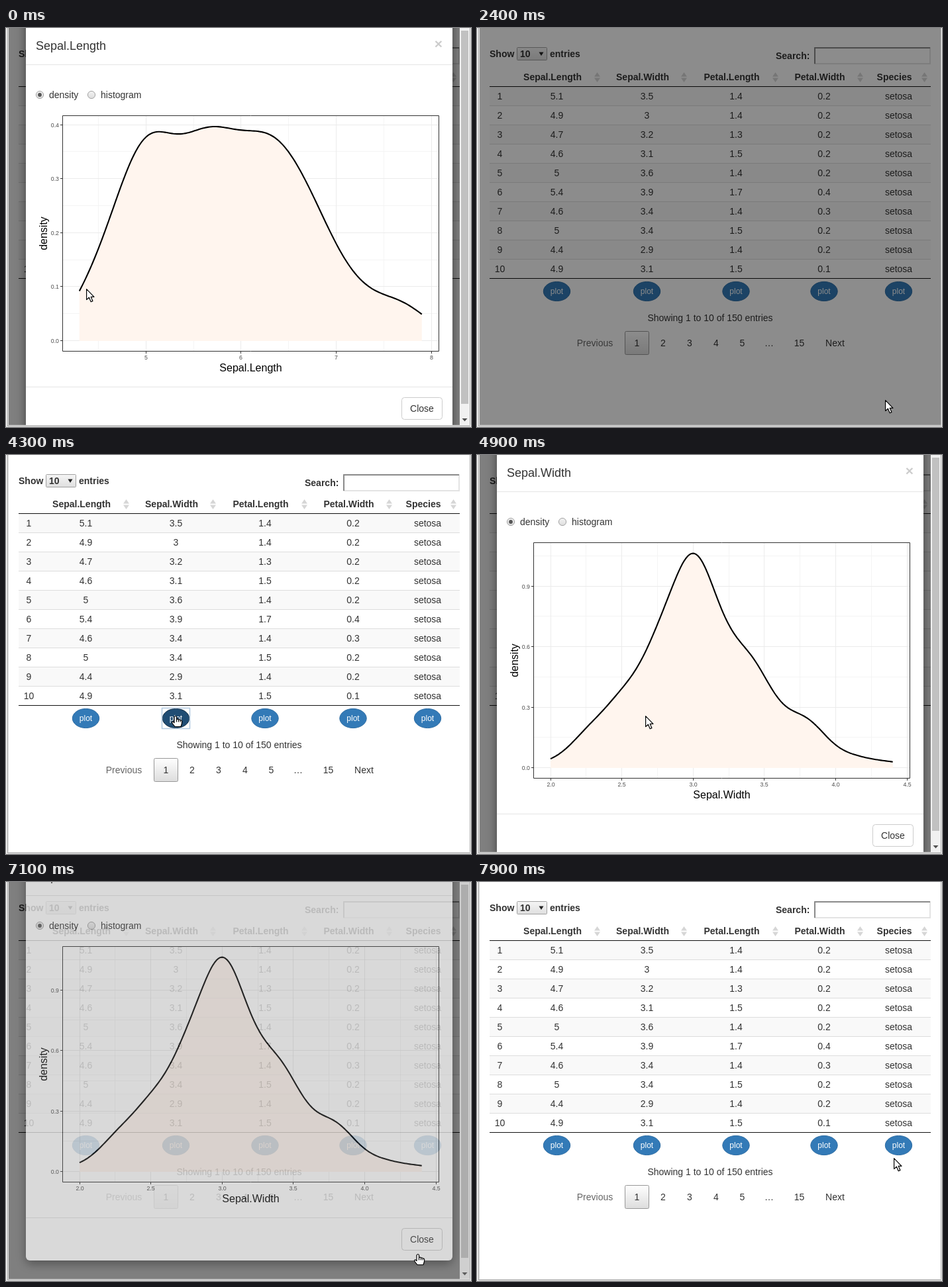
An HTML page with a canvas that plays this animation: 702 px wide and 603 px high, repeating every 8 s.

```html
<!DOCTYPE html>
<html lang="en">
<head>
<meta charset="utf-8">
<title>Column density plots</title>
<style>
html, body { margin: 0; width: 702px; height: 603px; overflow: hidden; background: #fff; }
canvas { display: block; }
</style>
</head>
<body>
<canvas id="stage" width="702" height="603"></canvas>
<script>
const W = 702, H = 603, LOOP = 8000;
const main = document.getElementById('stage').getContext('2d');
const layerCanvas = document.createElement('canvas');
layerCanvas.width = W;
layerCanvas.height = H;
const layer = layerCanvas.getContext('2d');
let g = main;

const FONT = '"Liberation Sans", Arial, sans-serif';
const COLS = [120.5, 256.5, 391, 524, 636.5];
const HEADS = [['Sepal.Length', 114, 181.5], ['Sepal.Width', 250, 312.5], ['Petal.Length', 384.5, 450.5],
  ['Petal.Width', 517.5, 578.5], ['Species', 630, 675.5]];
const ROWS = [
  [5.1, 3.5, 1.4, 0.2], [4.9, 3, 1.4, 0.2], [4.7, 3.2, 1.3, 0.2], [4.6, 3.1, 1.5, 0.2], [5, 3.6, 1.4, 0.2],
  [5.4, 3.9, 1.7, 0.4], [4.6, 3.4, 1.4, 0.3], [5, 3.4, 1.5, 0.2], [4.4, 2.9, 1.4, 0.2], [4.9, 3.1, 1.5, 0.1]];

// Each plot: sample counts in steps of 0.1, kernel bandwidth and axis scales
const PLOTS = [
  { name: 'Sepal.Length', from: 4.3, bw: 0.2736, x0: 5, px: 211.3, kx: 143.6, ky: 816,
    counts: [1, 3, 1, 4, 2, 5, 6, 10, 9, 4, 1, 6, 7, 6, 8, 7, 3, 6, 6, 4, 9, 7, 5, 2, 8, 3, 4, 1, 1, 3, 1, 1, 0, 1, 4, 0, 1],
    xs: ['5', '6', '7', '8'], xMinor: 0.5, ys: ['0.0', '0.1', '0.2', '0.3', '0.4'], yMinor: 0.05 },
  { name: 'Sepal.Width', from: 2, bw: 0.1233, x0: 2, px: 111, kx: 215.3, ky: 305,
    counts: [1, 0, 3, 4, 3, 8, 5, 9, 14, 10, 26, 11, 13, 6, 12, 6, 4, 3, 6, 2, 1, 1, 1, 0, 1],
    xs: ['2.0', '2.5', '3.0', '3.5', '4.0', '4.5'], xMinor: 0.25, ys: ['0.0', '0.3', '0.6', '0.9'], yMinor: 0.15 }];

// Cursor moves: start, end, x, y
const MOVES = [[0, 0, 121, 394], [200, 200, 119, 394], [400, 800, 573, 553], [1200, 1300, 616, 562],
  [2900, 3700, 264, 388], [3800, 3800, 254, 394], [5100, 5400, 434, 433], [5800, 5800, 579, 529],
  [6300, 6300, 620, 561], [6800, 6800, 634, 562], [7000, 7000, 620, 562], [7300, 7800, 627, 423],
  [7900, 7900, 629, 417]];

// Dialog states: start, backdrop alpha, dialog alpha, dialog shift, plot
const STATES = [[0, .5, 1, 0, 0], [2300, .5, .25, -85, 0], [2400, .45, 0, 0, 0], [2500, .2, 0, 0, 0],
  [2900, 0, 0, 0, 0], [4400, .25, 0, 0, 1], [4900, .5, 1, 0, 1], [7100, .5, .7, -35, 1],
  [7200, .5, .25, -85, 1], [7300, .45, 0, 0, 1], [7400, .2, 0, 0, 1], [7500, 0, 0, 0, 1]];

function text(s, x, y, size = 14, color = '#333', align = 'left', weight = '') {
  g.font = `${weight} ${size}px ${FONT}`;
  g.fillStyle = color;
  g.textAlign = align;
  g.fillText(s, x, y);
}

function rect(x, y, w, h, color) {
  g.fillStyle = color;
  g.fillRect(x, y, w, h);
}

function box(x, y, w, h, r, fill, stroke) {
  g.beginPath();
  g.roundRect(x + .5, y + .5, w - 1, h - 1, r);
  g.fillStyle = fill;
  g.fill();
  g.strokeStyle = stroke;
  g.lineWidth = 1;
  g.stroke();
}

function shape(points, fill) {
  g.beginPath();
  points.forEach(p => g.lineTo(p[0], p[1]));
  g.closePath();
  g.fillStyle = fill;
  g.fill();
}

function shade(y, h, ...colors) {
  const s = g.createLinearGradient(0, y, 0, y + h);
  colors.forEach((c, i) => s.addColorStop(i / (colors.length - 1), c));
  return s;
}

function drawControls() {
  text('Show', 19, 44, 14, '#333', 'left', 'bold');
  box(60, 29, 46, 20, 1, shade(29, 20, '#f6f6f6', '#dedede'), '#a0a0a0');
  text('10', 65, 44, 14, '#333', 'left', 'bold');
  shape([[93.5, 36.5], [100.5, 36.5], [97, 42]], '#222');
  text('entries', 110, 44, 14, '#333', 'left', 'bold');
  text('Search:', 451, 47, 14, '#333', 'left', 'bold');
  rect(509, 29, 176, 26, '#e3e3e3');
  rect(509, 29, 175, 2, '#8a8a8a');
  rect(509, 29, 2, 25, '#8a8a8a');
  rect(511, 31, 172, 22, '#fff');
}

function drawTable() {
  for (const [name, x, icon] of HEADS) {
    text(name, x, 79, 14, '#333', 'center', 'bold');
    shape([[icon - 4.5, 73.5], [icon + 4.5, 73.5], [icon, 67]], '#d6d6d6');
    shape([[icon - 4.5, 75.5], [icon + 4.5, 75.5], [icon, 82]], '#d6d6d6');
  }
  ROWS.forEach((row, i) => {
    const y = 89 + 29 * i;
    if (i % 2 === 0) rect(19, y, 666, 28, '#f9f9f9');
    if (i) rect(19, y - 1, 666, 1, '#ddd');
    text(i + 1, 34.5, y + 19, 14, '#333', 'center');
    [...row, 'setosa'].forEach((v, c) => text(v, COLS[c], y + 19, 14, '#333', 'center'));
  });
  rect(19, 88, 666, 1, '#111');
  rect(19, 378, 666, 1, '#111');
}

function drawButtons(t) {
  COLS.forEach((x, i) => {
    const hover = i === 1 && t >= 3700 && t < 4900;
    const active = hover && t >= 4300;
    g.beginPath();
    g.ellipse(x, 398, 20.2, 14.6, 0, 0, 7);
    g.fillStyle = active ? '#204d74' : hover ? '#286090' : '#337ab7';
    g.fill();
    g.strokeStyle = active ? '#122b40' : hover ? '#204d74' : '#2e6da4';
    g.lineWidth = 1;
    g.stroke();
    text('plot', x, 402, 12, '#fff', 'center');
    if (active) {
      g.strokeStyle = '#b4cbe2';
      g.lineWidth = 1.6;
      g.strokeRect(235.5, 382.5, 42, 31);
    }
  });
}

function drawPager() {
  text('Showing 1 to 10 of 150 entries', 352, 443, 14, '#333', 'center');
  text('Previous', 178, 481, 14, '#666', 'center');
  box(223, 458, 37, 36, 2, shade(458, 36, '#fff', '#dcdcdc'), '#979797');
  [['1', 241.5], ['2', 281], ['3', 321], ['4', 361], ['5', 400.5], ['…', 441], ['15', 486.5], ['Next', 540.5]]
    .forEach(([s, x]) => text(s, x, 481, 14, '#333', 'center'));
}

function drawPage(t) {
  rect(0, 0, W, H, '#fff');
  drawControls();
  drawTable();
  drawButtons(t);
  drawPager();
}

function drawEdges() {
  rect(0, 0, 2, H, '#ececec');
  rect(2, 0, 1, H, '#a0a0a0');
  rect(3, 0, 1, 601, '#e4e4e4');
  rect(700, 0, 1, 601, '#b0b0b0');
  rect(701, 0, 1, H, '#f0f0f0');
  rect(3, 600, 698, 1, '#e4e4e4');
  rect(2, 601, 699, 1, '#a0a0a0');
  rect(0, 602, W, 1, '#ececec');
}

function density(p, v) {
  let sum = 0;
  p.counts.forEach((n, i) => {
    const z = (v - p.from - i * .1) / p.bw;
    sum += n * Math.exp(-z * z / 2);
  });
  return sum / (150 * p.bw * Math.sqrt(2 * Math.PI));
}

function curve(p) {
  const span = (p.counts.length - 1) * .1;
  return Array.from({ length: 201 }, (_, i) => {
    const v = p.from + span * i / 200;
    return [p.px + (v - p.x0) * p.kx, 472.5 - density(p, v) * p.ky];
  });
}
PLOTS.forEach(p => p.line = curve(p));

function drawPlot(p) {
  const X = v => Math.round(p.px + (v - p.x0) * p.kx - .5);
  const Y = v => Math.round(472 - v * p.ky);
  const vLine = (v, c) => { if (X(v) > 86 && X(v) < 653) rect(X(v), 133, 1, 355, c); };
  const hLine = (v, c) => { if (Y(v) > 133) rect(86, Y(v), 567, 1, c); };
  for (const s of ['', ...p.xs]) vLine((s === '' ? p.x0 - 2 * p.xMinor : +s) + p.xMinor, '#f4f4f4');
  for (const s of p.ys) hLine(+s + p.yMinor, '#f4f4f4');
  for (const s of p.xs) vLine(+s, '#ebebeb');
  for (const s of p.ys) hLine(+s, '#ebebeb');

  const a = p.line[0], b = p.line[p.line.length - 1];
  shape([...p.line, [b[0], 473], [a[0], 473]], '#fff5ee');
  g.beginPath();
  p.line.forEach(q => g.lineTo(q[0], q[1]));
  g.strokeStyle = '#000';
  g.lineWidth = 2.1;
  g.lineJoin = 'round';
  g.stroke();

  g.strokeStyle = '#333';
  g.lineWidth = 1;
  g.strokeRect(85.5, 132.5, 568, 356);
  for (const s of p.xs) {
    rect(X(+s), 489, 1, 3, '#333');
    text(s, X(+s) + .5, 501, 8.8, '#4d4d4d', 'center');
  }
  for (const s of p.ys) {
    rect(82, Y(+s), 3, 1, '#333');
    text(s, 80, Y(+s) + 3.5, 8.8, '#4d4d4d', 'right');
  }
  text(p.name, 369.5, 519, 16, '#000', 'center');
  g.save();
  g.translate(62, 310.5);
  g.rotate(-Math.PI / 2);
  text('density', 0, 0, 16, '#000', 'center');
  g.restore();
}

function radio(x, label, on) {
  g.beginPath();
  g.arc(x, 101, 5.6, 0, 7);
  g.fillStyle = shade(95, 12, '#f4f4f4', '#dcdcdc');
  g.fill();
  g.strokeStyle = '#a3a3a3';
  g.lineWidth = 1;
  g.stroke();
  if (on) {
    g.beginPath();
    g.arc(x, 101, 2.9, 0, 7);
    g.fillStyle = '#555';
    g.fill();
  }
  text(label, x + 14, 106);
}

function drawClose(mode) {
  const fill = ['#fff', '#e6e6e6', shade(558, 34, '#c2c2c2', '#d4d4d4', '#d4d4d4', '#d4d4d4')][mode];
  box(597, 558, 62, 34, 4, fill, ['#ccc', '#adadad', '#7d97a8'][mode]);
  if (mode === 2) {
    g.strokeStyle = 'rgba(120,160,190,.55)';
    g.beginPath();
    g.roundRect(598.5, 559.5, 59, 31, 3);
    g.stroke();
  }
  text('Close', 628, 580, 14, '#333', 'center');
}

function drawScrollbar() {
  rect(685, 0, 15, 600, '#f1f1f1');
  rect(687, 4, 11, 564, '#c1c1c1');
  shape([[688.5, 590], [696.5, 590], [692.5, 594.5]], '#505050');
}

function drawDialog(plot, shift, closeMode) {
  g.save();
  g.clearRect(0, 0, W, H);
  g.beginPath();
  g.rect(4, 0, 696, 600);
  g.clip();
  g.save();
  g.translate(0, shift);
  g.save();
  g.shadowColor = 'rgba(0,0,0,.5)';
  g.shadowBlur = 15;
  g.shadowOffsetY = 5;
  g.beginPath();
  g.roundRect(30, -40, 644, 647, 6);
  g.fillStyle = '#fff';
  g.fill();
  g.restore();
  text(plot.name, 45, 33, 18);
  text('×', 653, 31, 21, '#ccc', 'center', 'bold');
  rect(30, 55, 644, 1, '#e5e5e5');
  radio(51, 'density', true);
  radio(129, 'histogram', false);
  drawPlot(plot);
  rect(30, 542, 644, 1, '#e5e5e5');
  drawClose(closeMode);
  g.restore();
  drawScrollbar();
  g.restore();
}

function outline(fill) {
  g.closePath();
  g.fillStyle = fill;
  g.fill();
  g.strokeStyle = '#000';
  g.lineWidth = 1.2;
  g.lineJoin = 'round';
  g.stroke();
}

function drawArrow(x, y) {
  g.beginPath();
  [[0, 0], [0, 16], [3.8, 12.6], [6.6, 19.2], [9.3, 18], [6.6, 11.7], [11.4, 11.7]]
    .forEach(p => g.lineTo(x + .6 + p[0], y + .6 + p[1]));
  outline('#fff');
}

function drawHand(x, y) {
  g.save();
  g.translate(x + 2, y + .5);
  g.beginPath();
  g.moveTo(-2, 8);
  g.lineTo(-2, 1.5);
  g.quadraticCurveTo(0, -1.5, 1.5, 1.5);
  g.lineTo(1.5, 5);
  g.quadraticCurveTo(3.5, 4, 4.5, 5.8);
  g.quadraticCurveTo(6.5, 4.8, 7.2, 6.6);
  g.quadraticCurveTo(9.5, 6, 9.7, 8);
  g.lineTo(9.4, 11.5);
  g.lineTo(8, 16);
  g.lineTo(-1, 16);
  g.lineTo(-5.3, 10.5);
  g.quadraticCurveTo(-5.6, 8, -3.6, 8.6);
  g.lineTo(-2, 10.2);
  outline('#fff');
  for (const [i, top] of [[1.5, 5], [4.5, 6], [7.2, 7]]) {
    g.beginPath();
    g.moveTo(i, top);
    g.lineTo(i, 9);
    g.stroke();
  }
  g.restore();
}

function cursorAt(t) {
  let [, , x, y] = MOVES[0];
  for (const [start, end, tx, ty] of MOVES) {
    if (t < start) break;
    const u = Math.min(1, (t - start + 100) / (end - start + 100));
    const e = u * u * (3 - 2 * u);
    x += (tx - x) * e;
    y += (ty - y) * e;
  }
  return [x, y];
}

function draw(ms) {
  const t = Math.floor(ms / 100) * 100;
  const [, dim, alpha, shift, plot] = STATES.filter(s => s[0] <= t).pop();
  const [x, y] = cursorAt(t);
  const onClose = alpha > 0 && x >= 597 && x < 659 && y >= 558;
  const onPlot = t >= 3700 && t < 4900;
  const pressed = t === 2200 || t === 7000;

  g = main;
  drawPage(t);
  if (dim) rect(4, 0, 696, 600, `rgba(0,0,0,${dim})`);
  if (alpha) {
    g = layer;
    drawDialog(PLOTS[plot], shift, pressed ? 2 : onClose && !shift ? 1 : 0);
    g = main;
    g.globalAlpha = alpha;
    g.drawImage(layerCanvas, 0, 0);
    g.globalAlpha = 1;
  }
  drawEdges();
  (onClose || onPlot ? drawHand : drawArrow)(x, y);
}

const begin = performance.now();
function tick() {
  draw((performance.now() - begin) % LOOP);
  requestAnimationFrame(tick);
}
tick();
</script>
</body>
</html>
```
